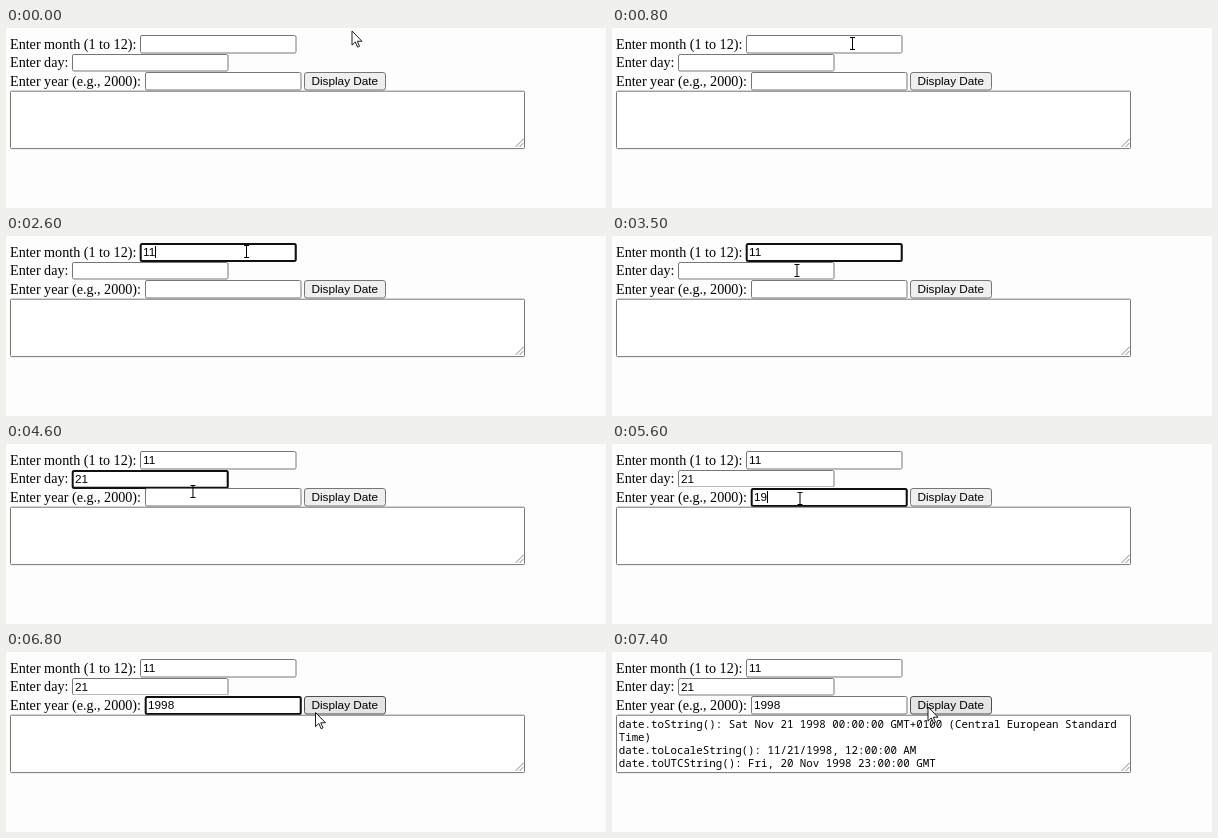
Recreate the animation shown at these times as an HTML page. Size 600 px wide and 180 px high, loop 8000 ms.

```html
<!DOCTYPE html>
<html lang="en">
<head>
<meta charset="utf-8">
<title>Date form</title>
<style>
  html, body { margin: 0; width: 100%; height: 100%; overflow: hidden; background: #fefdfe; }
  svg { display: block; }
  .label { font: 14.13px "Liberation Serif", serif; }
  .ui { font: 11.77px "Liberation Sans", sans-serif; }
  .out { font: 10.79px "Noto Sans Mono", monospace; white-space: pre; }
  .box { fill: #fff; stroke: #767676; }
  .ring { fill: none; stroke: #101010; stroke-width: 2; }
</style>
</head>
<body>
<svg width="600" height="180" viewBox="0 0 600 180">
  <g id="form"></g>
  <g id="button">
    <rect x="298.5" y="44.5" width="81" height="17.5" rx="2.5"/>
    <text class="ui" x="338.8" y="57.3" text-anchor="middle">Display Date</text>
  </g>
  <rect class="box" x="4.5" y="63.2" width="514" height="57.4" rx="1"/>
  <path d="M509.5 119 517.5 111M513.5 119 517.5 115" stroke="#777" stroke-width=".9"/>
  <g id="output" class="out"></g>
  <path id="caret" stroke="#000"/>
  <g id="cursor">
    <path id="beam" d="M-2.5-6H2.5M0-6V6M-2.5 6H2.5" stroke="#000" fill="none"/>
    <path id="arrow" d="M0 0V16L3.7 12.4 6.3 18.3 8.5 17.3 6 11.6H11.3Z" transform="scale(.883)" fill="#fff" stroke="#000"/>
  </g>
</svg>
<script>
const $ = id => document.getElementById(id);

function add(parent, tag, attrs, text = "") {
  const el = document.createElementNS("http://www.w3.org/2000/svg", tag);
  for (const key in attrs) el.setAttribute(key, attrs[key]);
  el.textContent = text;
  return parent.appendChild(el);
}

const show = (el, on) => el.setAttribute("visibility", on ? "visible" : "hidden");

// Each field: typed text, key times, and the span in which it has focus
const fields = [
  { label: "Enter month (1 to 12):", x: 134, y: 7, h: 18, value: "11", keys: [2400, 2600], focus: [900, 3600] },
  { label: "Enter day:", x: 66, y: 26, h: 17, value: "21", keys: [3800, 3900], focus: [3600, 4900] },
  { label: "Enter year (e.g., 2000):", x: 139, y: 44, h: 18, value: "1998", keys: [5300, 5600, 5700, 5900], focus: [4900, 7100] }
];
fields.forEach((f, i) => {
  const base = 20.5 + i * 18.5, form = $("form");
  add(form, "text", { class: "label", x: 4, y: base }, f.label);
  add(form, "rect", { class: "box", x: f.x + .5, y: f.y + .5, width: 155.5, height: f.h - .5, rx: 1.5 });
  f.text = add(form, "text", { class: "ui", x: f.x + 3, y: base - .2 });
  f.ring = add(form, "rect", { class: "ring", x: f.x + .7, y: f.y + 1, width: 155, height: 17, rx: 1.5 });
});
// The day field loses its lower edge while the year field has focus
const gap = add($("form"), "path", { d: "M67 43.5H222", stroke: "#fefdfe" });
$("form").insertBefore(gap, fields[2].ring);

[
  "date.toString(): Sat Nov 21 1998 00:00:00 GMT+0100 (Central European Standard",
  "Time)",
  "date.toLocaleString(): 11/21/1998, 12:00:00 AM",
  "date.toUTCString(): Fri, 20 Nov 1998 23:00:00 GMT"
].forEach((line, i) => add($("output"), "text", { x: 6.7, y: 75.7 + i * 13.25 }, line));

// Pointer stops: time, x, y
const path = [
  [0, 346, 3], [800, 240.5, 15.5], [3000, 240.5, 15.5], [3500, 185, 34.5], [4300, 185, 34.5],
  [4800, 188, 54.5], [6400, 188, 54.5], [6800, 309.5, 60.5], [7000, 316, 55], [8000, 316, 55]
];
const caretOn = [[900, 1500], [2000, 3100], [3600, 4400], [4900, 6500]];
const within = (t, [a, b]) => t >= a && t < b;

function pointer(t) {
  const i = path.findIndex((p, n) => n && t < p[0]);
  const [t0, x0, y0] = path[i - 1], [t1, x1, y1] = path[i];
  const u = (t - t0) / (t1 - t0), e = u * u * (3 - 2 * u);
  return [x0 + (x1 - x0) * e, y0 + (y1 - y0) * e];
}

function draw(t) {
  show($("caret"), false);
  for (const f of fields) {
    const focused = within(t, f.focus);
    f.text.textContent = f.value.slice(0, f.keys.filter(k => k <= t).length);
    show(f.ring, focused);
    if (focused && caretOn.some(span => within(t, span))) {
      const x = Math.floor(f.x + 3 + f.text.getComputedTextLength()) + .5;
      $("caret").setAttribute("d", `M${x} ${f.y + 3}v12`);
      show($("caret"), true);
    }
  }
  show(gap, within(t, fields[2].focus));
  show($("output"), t >= 7100);

  const [x, y] = pointer(t);
  const overField = fields.some(f => x > f.x && x < f.x + 156 && y > f.y && y < f.y + 18.5);
  const hover = x > 298 && x < 380 && y > 44 && y < 62;
  $("cursor").setAttribute("transform", `translate(${x} ${y})`);
  show($("beam"), overField);
  show($("arrow"), !overField);
  const face = $("button").firstElementChild;
  face.setAttribute("fill", hover ? "#e5e5e5" : "#efefef");
  face.setAttribute("stroke", hover ? "#4f4f4f" : "#767676");
}

const start = performance.now();
function frame() {
  const t = (performance.now() - start) % 8000;
  draw(Math.floor(t / 100) * 100);
  requestAnimationFrame(frame);
}
frame();
</script>
</body>
</html>
```
